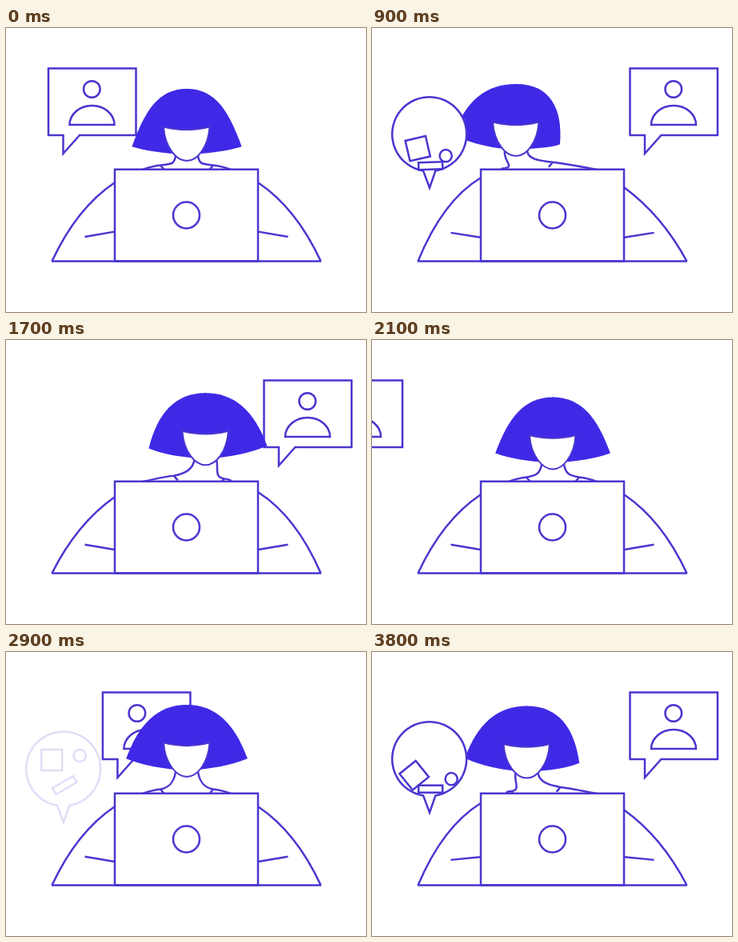
These frames come from a looping animation (450x355 px, 3900 ms). An HTML page with a canvas:

```html
<!DOCTYPE html>
<html>
<head>
<meta charset="utf-8">
<style>
html, body { margin: 0; width: 100%; height: 100%; overflow: hidden; background: #fff }
canvas { display: block }
</style>
</head>
<body>
<canvas id="stage" width="450" height="355"></canvas>
<script>
const LOOP = 3900, CYCLE = 2700, STEP = 100;
const LINE = '#4936d0', HAIR = '#3f29e6';
const g = document.getElementById('stage').getContext('2d');

// Progress of t from a to b, clamped to 0..1
const span = (t, a, b) => Math.min(1, Math.max(0, (t - a) / (b - a)));
const smooth = p => p * p * (3 - 2 * p);
const bump = (t, a, b) => Math.sin(Math.PI * span(t, a, b));
// Pulse from 0 to 1, a whole number of times per cycle
const beat = (t, count) => .5 + .5 * Math.cos(2 * Math.PI * count * t / CYCLE);

function shape(d, fill = '#fff') {
  const path = new Path2D(d);
  if (fill) { g.fillStyle = fill; g.fill(path); }
  g.stroke(path);
}

function circle(x, y, r) {
  g.beginPath();
  g.arc(x, y, r, 0, 7);
  g.stroke();
}

function box(x, y, w, h, degrees) {
  g.save();
  g.translate(x, y);
  g.rotate(degrees * Math.PI / 180);
  g.strokeRect(-w / 2, -h / 2, w, h);
  g.restore();
}

// Crosses from left to right, disappears, then slides in again from the left
function personX(t) {
  return t < 1850
    ? 53 + 269.5 * smooth(span(t, 0, 610))
    : -115 + 168 * smooth(span(t, 1900, 2500));
}

function personBubble(t) {
  const x = personX(t), lag = x - personX(t - 20);
  g.save();
  g.globalAlpha = t < 1850 ? 1 - span(t, 1700, 1800) : 1;
  g.translate(x, 0);
  shape('M0 50.5H109.5V134H39L18.5 157V134H0Z');
  circle(54.3 - lag, 76.5, 10.3);
  shape('M26.5 121a28 24 0 0 1 56 0Z');
  g.restore();
}

function shapesBubble(t) {
  const appear = span(t, 180, 300), leave = span(t, 1250, 1600);
  const drop = span(t, 550, 850) ** 2, roll = span(t, 900, 1100);
  g.save();
  g.globalAlpha = appear * (1 - span(t, 1420, 1600));
  g.translate(71.7, 148 - 12 * appear - 3.3 * drop + roll - 76 * leave);
  shape('M-7.6 45.9A46.5 46.5 0 1 1 7.6 45.9L.3 67Z');
  box(-14.5 - 4.5 * roll, -11 + 29 * drop + 2.5 * roll, 26, 26, -13 * drop - 26 * roll);
  circle(20.5 + 7 * roll, -16.5 + 43.5 * drop - 2 * roll, 7.6);
  box(1.5, 20.5 + 19 * drop - 2 * roll, 30, 9, -30 + 28 * drop + 2 * roll);
  g.restore();
}

function body(lean, hand) {
  for (const s of [-1, 1]) {
    const tilt = s * lean;
    g.save();
    g.translate(225.5, 0);
    g.scale(s, 1);
    shape(`M168 291.5Q137 ${225 - .2 * tilt} 90 ${193.5 - .13 * tilt}`, null);
    shape(`M127 ${255.7 + 5.5 * hand}L90 ${262 - 7.5 * hand}`, null);
    g.restore();
  }
}

function neck(cx, top, lean) {
  for (const s of [-1, 1]) {
    const tilt = s * lean;
    const x = 226 + .72 * lean + s * (33 - .14 * Math.max(0, tilt)), y = 171.5 + .08 * tilt;
    shape(`M${cx + s * 14} ${top + 84}C${cx + s * 16} ${top + 96} ${x - s * 12} ${y - 2} ${x} ${y}` +
      `Q${x + s * 10} ${y + 1} ${226 + s * 55} 177M${x} ${y}l${-s * 5} 6`, null);
  }
}

// Half of the hair; the side away from the lean tucks in and rounds
function hairSide(s, cx, top, nod, swing) {
  const k = s * swing, tuck = Math.min(0, k);
  const x = 76.5 - .72 * nod + (k < 0 ? k : .3 * k), y = 67 + .47 * nod - .33 * k;
  g.save();
  g.translate(cx, top);
  g.scale(s, 1);
  g.fillStyle = HAIR;
  g.fill(new Path2D(`M-1 0H0C${36 - .4 * tuck} 0 ${x - 16 - 1.1 * tuck} ${y - 44} ${x} ${y}` +
    'Q45 80 0 82H-1Z'));
  g.restore();
}

function woman(t) {
  const lean = 27 * bump(t, 1300, 1900) - 46 * bump(t, 500, 1300);
  const swing = .0085 * lean * Math.abs(lean);
  const typing = t <= 500 || t >= 1900;
  const nod = typing ? 11 * beat(t, 8) : 5 * (lean / 46) ** 2;
  const cx = 226 + lean, top = 65 + nod;

  body(lean, beat(t + 12, 7) ** 2);
  neck(cx, top, lean);
  hairSide(-1, cx, top, nod, swing);
  hairSide(1, cx, top, nod, swing);

  g.save();
  g.translate(cx, top);
  g.lineWidth = 2;
  shape('M-29 47.5Q0 55 28.5 47.5C27 73 13 90 0 90S-27.5 73-29 47.5Z');
  g.restore();
}

function laptop() {
  shape('M136 176.7H315V291.5H136Z');
  circle(225.5, 234, 16.5);
  shape('M57 291.5H394', null);
}

function draw(now) {
  const t = Math.floor((now + 16) / STEP) * STEP % LOOP % CYCLE;
  g.clearRect(0, 0, 450, 355);
  g.lineWidth = 2.5;
  g.strokeStyle = LINE;
  personBubble(t);
  woman(t);
  laptop();
  shapesBubble(t);
  requestAnimationFrame(draw);
}
requestAnimationFrame(draw);
</script>
</body>
</html>
```
